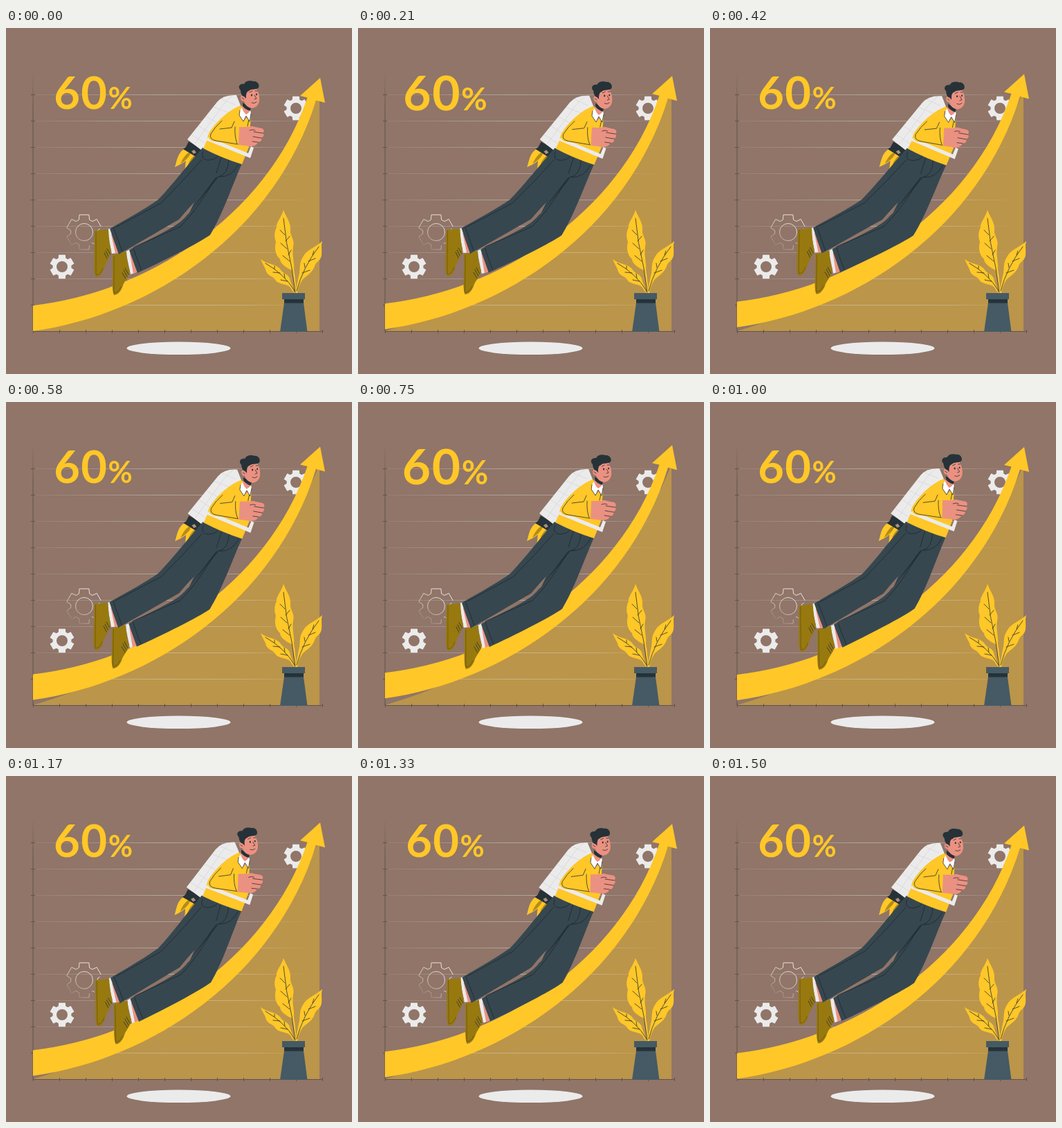
Animation, 500 px wide and 500 px high, one loop 1.54 s. Source, as an HTML page:

```html
<!DOCTYPE html>
<html lang="en">
<head>
<meta charset="utf-8">
<title>Growth</title>
<style>
  html, body { margin: 0; width: 100%; height: 100%; overflow: hidden; background: #907568; }
  svg { display: block; width: 100vw; height: 100vh; }
  text { font: 700 65px Lato, "Open Sans", sans-serif; fill: #ffc727; text-anchor: middle; letter-spacing: 1.5px; }
  .small { font-size: 43px; letter-spacing: 0; }
  .yellow { fill: #ffc727; }
  .light { fill: #ebebeb; }
  .dark { fill: #263238; }
  .cloth { fill: #37474f; }
  .skin { fill: #eb9181; }
  .shoe { fill: #98790f; }
  .line { fill: none; stroke: #263238; stroke-width: .8; stroke-linecap: round; stroke-linejoin: round; }
  .seam { fill: none; stroke: #1d282e; stroke-width: .8; }
  .axis { fill: none; stroke: #62524d; stroke-width: 1; }
</style>
</head>
<body>
<svg viewBox="0 0 500 500">
  <defs>
    <linearGradient id="gridFade" gradientUnits="userSpaceOnUse" x1="39" x2="442" y1="0" y2="0">
      <stop stop-color="#ddd" stop-opacity=".1"/>
      <stop offset=".45" stop-color="#ddd" stop-opacity=".5"/>
      <stop offset=".75" stop-color="#ddd" stop-opacity=".4"/>
      <stop offset="1" stop-color="#ddd" stop-opacity="0"/>
    </linearGradient>
    <linearGradient id="axisFade" gradientUnits="userSpaceOnUse" x1="0" x2="0" y1="62" y2="120">
      <stop stop-color="#62524d" stop-opacity="0"/>
      <stop offset="1" stop-color="#62524d"/>
    </linearGradient>
    <linearGradient id="gearFade" gradientUnits="userSpaceOnUse" x1="125" x2="98" y1="280" y2="318">
      <stop stop-color="#f4efed"/>
      <stop offset=".55" stop-color="#f4efed" stop-opacity=".7"/>
      <stop offset="1" stop-color="#f4efed" stop-opacity=".1"/>
    </linearGradient>
  </defs>

  <ellipse class="light" cx="249.500" cy="462.800" rx="75" ry="9.300"/>
  <path id="gearLeft" class="light" fill-rule="evenodd"/>
  <path id="gearRight" class="light" fill-rule="evenodd"/>
  <path id="gearOutline" fill="none" stroke="url(#gearFade)" stroke-width=".9" stroke-dasharray="118 5 7 4 16 6 5 5"/>

  <path fill="#bb954a" d="M39 438C190 395 380 280 453 90V438Z"/>
  <path id="grid" fill="none" stroke="url(#gridFade)" stroke-width=".9"/>
  <path d="M39 62V438.500" fill="none" stroke="url(#axisFade)"/>
  <path id="ticks" class="axis"/>

  <path id="arrow" class="yellow" d="M39 401C200 383 377 274 435.500 100.500L425 98L454 72L461 108L448 104.500C389 295 212 414 39 438Z"/>

  <g id="percent"><text x="126" y="117">60<tspan class="small">%</tspan></text></g>

  <g id="plant">
    <path class="yellow" d="M417 383C417 368 415 358 413 350C404 346 396 340 396 334C388 327 388 316 390 309C387 301 388 294 391 288C390 281 398 274 401 263C405 274 412 281 411 292C410 300 418 306 415 316C413 328 417 338 416 349Q419 365 419 383Z"/>
    <path class="yellow" d="M418 383C421 370 422 362 424 354C425 346 424 338 429 331C434 320 448 317 457 308C455 316 457 321 456 328C455 337 448 337 446 344C443 353 436 357 429 363Q422 373 421 383Z"/>
    <path class="yellow" d="M416 383C415 373 411 368 410 362C407 354 399 355 396 348C390 341 376 341 368 334C371 342 374 345 376 352C379 359 386 358 389 364C393 371 406 369 411 375Z"/>
    <path class="line" d="M401 275Q404 310 413 347L418 382M403 299L396 292M404 308L410 301M406 319L397 311M408 328L412 321M410 337L400 329M452 316Q429 346 420 380M443 328L445 322M437 337L447 333M432 346L431 340M428 354L439 350M375 340Q403 356 417 380M388 348L388 344M396 354L386 353M403 361L402 355M407 366L397 364"/>
    <path fill="#455a64" d="M399 383H432V392H399ZM402 397H430L435.500 439H396Z"/>
    <path class="dark" d="M402 392H430V397.500H402Z"/>
  </g>

  <g id="man">
    <path class="yellow" d="M257 175C247 182 247 193 244 201C255 196 265 190 268 181ZM266 181C257 191 261 196 258 206C266 199 273 194 275 185Z"/>
    <path fill="#b68b17" d="M264 180C258 184 255 190 252 196Q263 190 267 181ZM272 184Q264 192 263 199Q271 193 274 185Z"/>
    <path class="dark" d="M264 164L283 175L276 187L256 175L260 172Z"/>
    <path fill="#a59085" d="M268 178L272 176L275 180L271 182Z"/>
    <path class="light" d="M262 161L305 107Q314 96 333 97L339 112L307 155L283 177Z"/>
    <path d="M268 154L292 169M278 141L302 157M289 128L313 141M300 114L326 124M273 167L308 119Q316 106 327 98M312 103L331 111" fill="none" stroke="#d4d4d4" stroke-width=".7"/>

    <path class="light" d="M147 291L152 289L163 325L153 326Q149 310 147 291ZM173 323L179 320L191 352L180 356Z"/>
    <path class="skin" d="M152 298L155 297L163 325L158 326ZM179 326L182 326L191 352L184 355Z"/>
    <path class="shoe" d="M128 293L148 291Q149 311 152 321C151 333 144 337 142 346Q138 360 131 360Q127 357 127 345ZM154 328L174 323Q175 342 179 351C178 361 170 366 168 375Q163 386 156 386Q153 380 154 360Z"/>
    <path d="M130 294V357Q137 357 140 347M156 329V383Q163 382 166 374" fill="none" stroke="#6b560d" stroke-width=".8"/>
    <path class="line" d="M142 325L146 333M144 322L148 330M146 319L151 327M168 354L173 362M170 350L175 359M172 347L177 356"/>

    <path class="cloth" d="M284 173L326 195L304 224C285 246 276 260 262 270C240 282 190 312 163 327Q156 308 150 290C173 277 202 261 220 248C242 225 262 198 284 173Z"/>
    <path class="cloth" d="M292 177L341 196C329 222 313 270 295 299C280 310 225 338 190 354Q183 335 178 321C205 306 235 293 252 280C270 265 282 239 297 218Z"/>
    <path fill="#907568" d="M249 278Q259 273 265 267L272 252Q264 260 249 278Z"/>
    <path class="dark" d="M266 265L303 216L308 214Q288 240 266 265Z"/>
    <path class="seam" d="M283 190Q255 222 224 253L158 288M155 288Q161 303 168 323M184 318Q189 334 196 350M184 317L252 287Q276 263 300 222M285 178Q280 190 292 191Q303 190 306 185M336 197Q326 216 308 215M322 190Q321 212 307 215M311 187L304 210"/>

    <path class="yellow" d="M339 112C325 117 309 130 297 146Q291 154 291 161L285 174Q312 188 341 197L351 172L354 125Z"/>
    <path class="light" d="M293 158L350 181L354 171L358 173L353 188L289 162Z"/>
    <path class="yellow" d="M329 120C314 126 302 140 294 152Q290 162 301 164L336 169L338 143L330 142Z"/>
    <path class="line" d="M330 135L326 144L309 146M312 134Q302 143 296 153Q293 161 304 163L335 168M331 143Q330 157 334 167M351 132L349 142"/>

    <path class="skin" d="M337 143L351 143Q355 141 360 143L370 145Q375 148 371 152Q375 155 369 159Q371 164 364 165Q362 171 353 171L336 169Z"/>
    <path class="line" d="M358 150L371 152M357 157L369 159M356 164L364 165M352 148Q357 146 360 148"/>

    <path class="skin" d="M342 110L354 113L353 127L345 132L340 119Z"/>
    <path class="dark" d="M342 108L354 115L353 120Q346 118 342 113Z"/>
    <path class="skin" d="M344 91L362 88Q367 96 366 106Q364 115 355 116Q346 114 344 106Q339 106 339 100Q340 96 344 98Z"/>
    <path class="dark" d="M344 99C341 99 339 94 339 90C334 85 338 80 344 81C347 75 354 76 358 77C363 76 367 82 365 86C362 90 354 87 351 91Q346 92 347 102Z"/>
    <path class="line" d="M352 93L356 91M360 91L363 91M359 97L362 102L359 103M355 108Q359 110 362 107M341 101L344 103"/>
    <ellipse class="dark" cx="355" cy="97" rx="1.100" ry="1.500"/>
    <ellipse class="dark" cx="362" cy="96" rx="1" ry="1.400"/>
    <path fill="#fff" d="M338 119L341 115Q343 122 347 125Q351 123 353 119L354 124L352 135L347 127L343 135L337 126Z"/>
    <path class="line" d="M338 119L337 126L343 135L347 127L352 135L354 124"/>
  </g>
</svg>
<script>
  const LOOP = 1540;
  const el = id => document.getElementById(id);
  const range = (n, f) => Array.from({ length: n }, (_, i) => f(i)).join("");

  const ring = (cx, cy, r) => `M${cx - r} ${cy}a${r} ${r} 0 1 1 ${2 * r} 0a${r} ${r} 0 1 1 ${-2 * r} 0Z`;

  function gear(cx, cy, outer, body, hole, turn) {
    const teeth = [[body, -.4], [outer, -.27], [outer, .27], [body, .4]];
    const points = range(6, i => teeth.map(([r, offset]) => {
      const a = turn + i * Math.PI / 3 + offset;
      return `${cx + r * Math.cos(a)} ${cy + r * Math.sin(a)} `;
    }).join(""));
    return `M${points}Z` + ring(cx, cy, hole);
  }

  el("gearLeft").setAttribute("d", gear(81, 345, 18, 13.5, 8, Math.PI / 6));
  el("gearRight").setAttribute("d", gear(419, 116, 18, 13.5, 8, Math.PI / 6));
  el("gearOutline").setAttribute("d", gear(113, 295, 26, 19.5, 12.5, Math.PI * 5 / 6));
  el("grid").setAttribute("d", range(9, i => `M39 ${96.5 + 38 * i}H442`));
  el("ticks").setAttribute("d", "M39 438.500H458" +
    range(9, i => `M36 ${96.5 + 38 * i}h6`) + range(12, i => `M${39.5 + 38 * i} 436v5`));

  // Linear interpolation through [position, value] stops.
  function track(p, stops) {
    const i = Math.max(1, stops.findIndex(s => s[0] >= p));
    const [a, from] = stops[i - 1], [b, to] = stops[i];
    return from + (to - from) * (p - a) / (b - a);
  }

  const float = [[0, 0], [.5, -10], [1, 0]];
  const sway = [[0, 0], [.25, 1], [.75, -1], [1, 0]];
  const beat = [[0, 1], [.27, 1], [.47, 1.1], [.57, 1], [1, 1]];

  function draw(now) {
    const p = now % LOOP / LOOP;
    const scale = track(p * 3 % 1, beat);
    el("arrow").setAttribute("transform", `translate(0 ${track(p, float)})`);
    el("man").setAttribute("transform", `rotate(${track(p, sway)} 251 231)`);
    el("percent").setAttribute("transform", `translate(126 93.500) scale(${scale}) translate(-126 -93.500)`);
  }

  let start;
  function tick(now) {
    start ??= now;
    draw(now - start);
    requestAnimationFrame(tick);
  }
  draw(0);
  requestAnimationFrame(tick);
</script>
</body>
</html>
```
